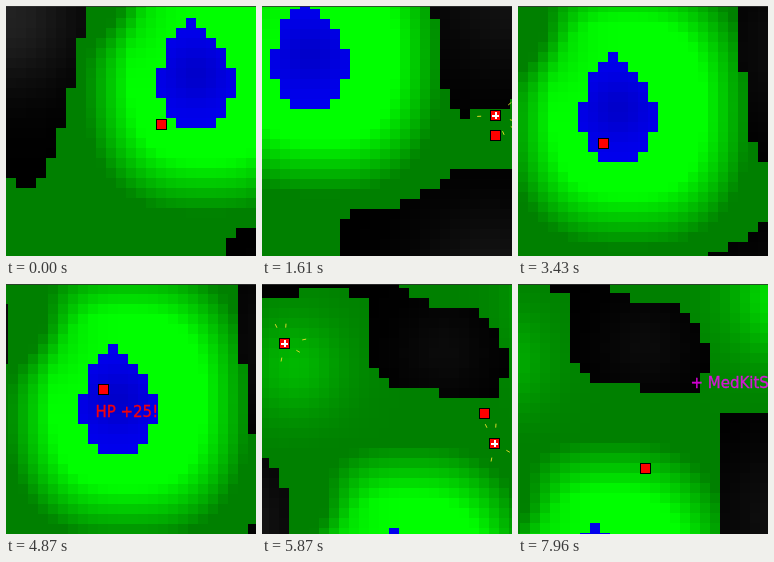
Recreate the animation shown at these times as an HTML page with a canvas. Size 250x250 px, loop 8 s.

```html
<!DOCTYPE html>
<html lang="en">
<head>
<meta charset="utf-8">
<title>Tile map walk</title>
<style>
  html, body { margin: 0; width: 100%; height: 100%; overflow: hidden; background: #000; }
  canvas { display: block; width: 250px; height: 250px; }
</style>
</head>
<body>
<canvas id="stage" width="250" height="250"></canvas>
<script>
const LOOP = 8000, SIZE = 250, TILE = 10;
const ctx = document.getElementById('stage').getContext('2d');

// Outlines in tile units; a tile belongs to an area when its centre lies inside.
const lake = new Path2D('M18.5 1 L22 4.6 23 7.5 21 11.9 17 11.9 15 7.5 16 4Z');
const chasms = [
  'M-11 -6 L5.9 -6 8 -2 8 1 5.6 11.8 3.2 17.8 1 18 .4 17 -11 17Z',
  `M-11 -28 L18.6 -28 19 -23.4 22.2 -21.1 26.7 -20.8 28.6 -18.5 29.8 -16 29.6 -14.4 28.8 -12
    22.8 -12 22.8 -13 18.2 -13 16 -15.2 16 -22 14 -22 14 -23 9 -23 9 -22 -11 -22Z`,
  `M31 -10 L48 -10 47 2 45 4.7 44 7 43.6 10 42.8 11 39 11 39 12 35 12 35 13 34 13 34 12
    33 12 32.5 10 31.5 3 31 2Z`,
  'M33.5 18 L43.9 18 46.4 20.5 47 34 22 34 22 23.5 23 22.5 28 21.5 32 19.5Z'
].map(d => new Path2D(d));

const clamp = (v, lo, hi) => Math.max(lo, Math.min(hi, v));
const bump = (x, y, cx, cy, r) => Math.exp(-((x - cx) ** 2 + (y - cy) ** 2) / (r * r));

function grass(x, y) {
  const d = Math.pow(Math.abs((x - 200) / 122) ** 2.6 + Math.abs((y - 68) / 140) ** 2.6, 1 / 2.6);
  const g = 128 + 127 * clamp((1 - d) / 0.38, 0, 1)
    - 70 * bump(x, y, 105, 0, 40)
    + 55 * bump(x, y, 85, -150, 50)
    + 115 * bump(x, y, 385, -215, 60)
    + 70 * bump(x, y, 485, 60, 50);
  return `rgb(0,${Math.round(clamp(g, 128, 255))},0)`;
}

function dark(x, y) {
  const v = Math.round(34 * bump(x, y, 0, 10, 70) + 18 * bump(x, y, 390, 10, 75)
    + 20 * bump(x, y, 370, 290, 70) + 10 * bump(x, y, 235, -165, 45));
  return `rgb(${v},${v},${v})`;
}

const water = (x, y) => `rgb(0,0,${Math.round(240 - 38 * bump(x, y, 190, 68, 32))})`;

// The world is painted once; the camera slides over it.
const LEFT = -100, TOP = -258, COLS = 60, ROWS = 59;
const world = document.createElement('canvas');
world.width = COLS * TILE;
world.height = ROWS * TILE;
const paint = world.getContext('2d');

for (let i = 0; i < COLS * ROWS; i++) {
  const x = LEFT + (i % COLS) * TILE, y = TOP + Math.floor(i / COLS) * TILE;
  const inside = path => paint.isPointInPath(path, x / TILE + 0.5, (y - 2) / TILE + 0.5);
  const shade = inside(lake) ? water : chasms.some(inside) ? dark : grass;
  paint.fillStyle = shade(x + 5, y + 5);
  paint.fillRect(x - LEFT, y - TOP, TILE, TILE);
}

// Keys: [time, x, y]
const cameraKeys = [
  [300, 0, 0], [1610, 142, 19], [2520, 222, -2], [3430, 90, -34], [4390, 90, -34],
  [4870, 78, -48], [5870, 53, -232], [6830, 108, -227]
];
const playerKeys = [
  [300, 155, 118], [600, 185, 148], [1560, 375, 148], [2150, 375, 148], [2270, 375, 128],
  [2520, 375, 128], [3430, 175, 103], [4390, 175, 103], [4870, 175, 57], [5270, 175, -3],
  [5870, 275, -103], [6130, 285, -73], [6700, 235, -43]
];

function segment(keys, t) {
  let i = 0;
  while (i < keys.length - 2 && t >= keys[i + 1][0]) i++;
  const span = keys[i + 1][0] - keys[i][0];
  return [i, clamp((t - keys[i][0]) / span, 0, 1), span];
}

function linear(keys, t) {
  const [i, u] = segment(keys, t);
  return [1, 2].map(a => keys[i][a] + (keys[i + 1][a] - keys[i][a]) * u);
}

function slope(keys, i, axis) {
  if (i === 0 || i === keys.length - 1) return 0;
  const rate = k => (keys[k + 1][axis] - keys[k][axis]) / (keys[k + 1][0] - keys[k][0]);
  const a = rate(i - 1), b = rate(i);
  return a * b <= 0 ? 0 : 2 * a * b / (a + b);
}

function smooth(keys, t) {
  const [i, u, span] = segment(keys, t);
  const ease = u * u * (3 - 2 * u);
  return [1, 2].map(a => {
    const p = keys[i][a], q = keys[i + 1][a];
    return p + (q - p) * ease
      + span * slope(keys, i, a) * u * (1 - u) ** 2
      - span * slope(keys, i + 1, a) * u * u * (1 - u);
  });
}

const MAGENTA = '#f0f', RED = '#f00', LABEL_LIFE = 2.4;
const kits = [
  { x: 375, y: 128, taken: 2270 },
  { x: 285, y: -73, taken: 6130 },
  { x: 75, y: -173, taken: LOOP }
];
const labels = [
  ...kits.map(k => ({ text: '+ MedKitSmall', color: MAGENTA, x: k.x, y: k.y, at: k.taken })),
  { text: 'HP +25!', color: RED, x: 172, y: 103, at: 4390 }
];

function box(x, y) {
  ctx.fillStyle = '#000';
  ctx.fillRect(x - 5, y - 5, 11, 11);
  ctx.fillStyle = RED;
  ctx.fillRect(x - 4, y - 4, 9, 9);
}

function sparkles(x, y, t) {
  ctx.strokeStyle = '#d8d828';
  ctx.lineWidth = 1;
  for (let i = 0; i < 5; i++) {
    const age = t / 500 + i * 0.37;
    const random = Math.sin(Math.floor(age) * 12.9 + i * 78.2) * 43758.5;
    const angle = (random - Math.floor(random)) * Math.PI * 2;
    const r = 13 + 6 * (age % 1);
    const c = Math.cos(angle), s = Math.sin(angle);
    ctx.beginPath();
    ctx.moveTo(x + 0.5 + c * r, y + 0.5 + s * r);
    ctx.lineTo(x + 0.5 + c * (r + 4), y + 0.5 + s * (r + 4));
    ctx.stroke();
  }
}

function kit(x, y, t) {
  box(x, y);
  ctx.fillStyle = '#fff';
  ctx.fillRect(x - 3, y, 7, 2);
  ctx.fillRect(x, y - 3, 2, 7);
  sparkles(x, y, t);
}

function label({ text, color, x, y, at }, t) {
  const age = (t - at) / 1000;
  if (age < 0 || age > LABEL_LIFE) return;
  const left = x - 4.6, base = Math.round(y - 6 - 24 * age);
  ctx.globalAlpha = 1 - 0.1 * age;
  ctx.fillStyle = ctx.strokeStyle = color;
  ctx.lineWidth = 0.3;
  ctx.fillText(text, left, base);
  ctx.strokeText(text, left, base);
  ctx.globalAlpha = 1;
}

function draw(t) {
  const [cx, cy] = smooth(cameraKeys, t).map(Math.round);
  const [px, py] = linear(playerKeys, t).map(Math.round);
  ctx.setTransform(1, 0, 0, 1, -cx, -cy);
  ctx.drawImage(world, LEFT, TOP);
  for (const k of kits) if (t < k.taken) kit(k.x, k.y, t);
  box(px, py);
  ctx.font = '15px "DejaVu Sans", sans-serif';
  labels.forEach(l => label(l, t));
  ctx.setTransform(1, 0, 0, 1, 0, 0);
  ctx.fillStyle = 'rgba(50,50,50,0.8)';
  ctx.fillRect(0, 0, SIZE, 1);
}

const start = performance.now();
function frame() {
  draw((performance.now() - start) % LOOP);
  requestAnimationFrame(frame);
}
frame();
</script>
</body>
</html>
```
